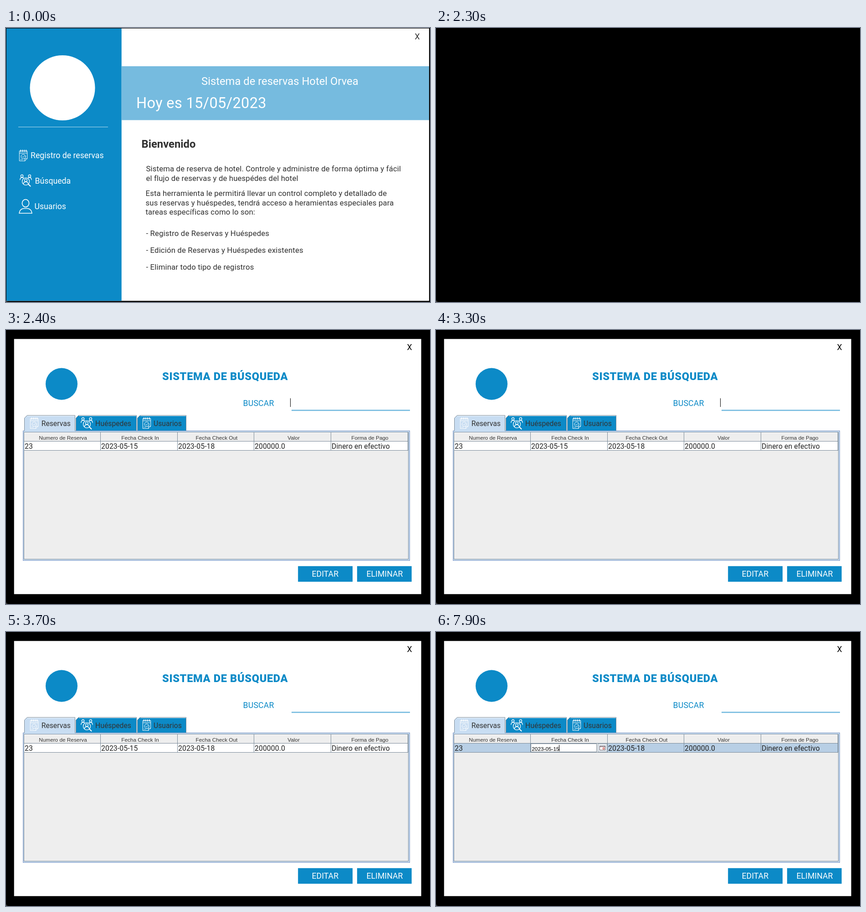
These frames come from a looping animation (931x602 px, 8000 ms). An HTML page:

```html
<!DOCTYPE html>
<html lang="es">
<head>
<meta charset="utf-8">
<title>Sistema de reservas</title>
<style>
html, body { margin: 0; width: 100%; height: 100%; overflow: hidden; background: #000; }
svg { display: block; position: absolute; left: 0; top: 0; }
text { font-family: Roboto, sans-serif; white-space: pre; }
.ui { font-family: "Liberation Sans", Arial, sans-serif; font-size: 11.8px; }
.icon { fill: none; stroke: #fff; stroke-linecap: round; stroke-linejoin: round; }
</style>
</head>
<body>
<svg id="stage" width="931" height="602" viewBox="0 0 931 602"></svg>
<script>
const BLUE = '#0c8ac7', SKY = '#76bbdf', INK = '#303030';
const STEEL = '#7a8a99', EDGE = '#7c95c2', PALE = '#c8ddf2', GREY = '#eeeeee', PICK = '#b8cfe5';

const rect = (x, y, w, h, fill, more = '') =>
  `<rect x="${x}" y="${y}" width="${w}" height="${h}" fill="${fill}" ${more}/>`;
const frame = (x, y, w, h, color, fill = 'none') =>
  rect(x + .5, y + .5, w - 1, h - 1, fill, `stroke="${color}"`);
const path = (d, stroke, fill = 'none', width = 1) =>
  `<path d="${d}" stroke="${stroke}" fill="${fill}" stroke-width="${width}"/>`;
const text = (x, y, size, str, fill = INK, more = '') =>
  `<text x="${x}" y="${y}" font-size="${size}" fill="${fill}" ${more}>${str}</text>`;
const label = (x, y, str, fill = '#333', more = '') =>
  `<text class="ui" x="${x}" y="${y}" fill="${fill}" ${more}>${str}</text>`;
const use = (id, x, y) => `<use href="#${id}" x="${x}" y="${y}"/>`;
const group = (id, body) => `<g id="${id}">${body}</g>`;

const defs = `<defs>
  <g id="book" class="icon" stroke-width="1">
    <path d="M.8 3.5V25H13L18.2 20V3.5ZM13 25V20H18M1 8H18"/>
    <path d="M3.5 1V5M7.5 1V5M11.5 1V5M15.5 1V5" stroke-width="1.6"/>
    <circle cx="9.5" cy="15.5" r="5"/><path d="M7 15.5L9 17.5L12.5 13.5"/>
    <path d="M3 22H8" stroke-width=".8"/>
  </g>
  <g id="people" class="icon" stroke-width="1.3">
    <circle cx="5" cy="3.7" r="2.7"/><circle cx="21.8" cy="3.7" r="2.7"/>
    <path d="M.8 12Q1 7 5 7Q7.5 7 8.5 8M26 12Q26 7 21.800 7Q19.500 7 18.500 8"/>
    <circle cx="13.5" cy="15.7" r="8"/><circle cx="13.5" cy="13" r="2.9"/>
    <path d="M8.5 21Q8.5 16.5 13.5 16.5T18.5 21"/>
    <path d="M19.5 22L23.5 26" stroke-width="2.2"/>
  </g>
  <g id="user" class="icon" stroke-width="1.7">
    <ellipse cx="15" cy="9" rx="7.6" ry="8.3"/>
    <path d="M1 31Q2 21.5 11 20.5H19Q28 21.5 29 31Z"/>
  </g>
</defs>`;

function menuView() {
  const body = (x, y, str) => text(x, y, 16.75, str, INK, 'letter-spacing=".14"');
  return rect(1, 1, 928, 598.5, '#fff') + rect(1, 1, 252.7, 598.5, BLUE) +
    group('hover', rect(1, 308, 252.7, 55, SKY)) +
    '<circle cx="124" cy="131.5" r="71.5" fill="#fff"/>' +
    rect(27, 217, 197, 1, '#b5dcef') +
    use('book', 28.5, 267) + text(54, 286, 17.7, 'Registro de reservas', '#fff') +
    use('people', 30, 321.5) + text(63.5, 341.5, 17.7, 'Búsqueda', '#fff') +
    use('user', 28, 376) + text(62.5, 398, 17.7, 'Usuarios', '#fff') +
    text(897.5, 25, 17.7, 'X') +
    rect(253.7, 84, 675.3, 118.4, SKY) +
    text(429, 125, 23.8, 'Sistema de reservas Hotel Orvea', '#fff') +
    text(286, 176, 32.5, 'Hoy es 15/05/2023', '#fff', 'letter-spacing=".35"') +
    text(297.5, 263, 23.8, 'Bienvenido', INK, 'font-weight="700"') +
    body(307.5, 315, 'Sistema de reserva de hotel. Controle y administre de forma óptima y fácil') +
    body(307.5, 335.5, 'el flujo de reservas y de huespédes del hotel') +
    body(306.5, 369, 'Esta herramienta le permitirá llevar un control completo y detallado de') +
    body(306.5, 389.5, 'sus reservas y huéspedes, tendrá acceso a heramientas especiales para') +
    body(306.5, 410, 'tareas específicas como lo son:') +
    body(307.5, 456.5, '- Registro de Reservas y Huéspedes') +
    body(307.5, 494, '- Edición de Reservas y Huéspedes existentes') +
    body(307.5, 531, '- Eliminar todo tipo de registros');
}

function tab(x, w, icon, ix, tx, name, fill) {
  const d = `M${x + .5} 221.5V193.5L${x + 6.5} 187.5H${x + w - .5}V221.5`;
  return path(d, STEEL, fill) +
    path(`M${x + 7} 188.5H${x + w - 1}`, '#fff') +
    use(icon, ix, 191.5) + text(tx, 210.5, 15.75, name, '#333');
}

function table() {
  const cols = [
    [40, 'Numero de Reserva', '23', 125],
    [208, 'Fecha Check In', '2023-05-15', 294.5],
    [377, 'Fecha Check Out', '2023-05-18', 462.5],
    [545, 'Valor', '200000.0', 631.5],
    [714, 'Forma de Pago', 'Dinero en efectivo', 799]
  ];
  const edges = cols.slice(1).map(c => c[0] - 1).concat(882);
  return frame(37, 221, 850, 286, EDGE, PALE) + frame(39, 224, 845, 280, STEEL, GREY) +
    rect(40, 225, 842, 1, '#fff') +
    rect(40, 245, 842, 19, '#fff') + group('picked', rect(40, 245, 842, 19, PICK)) +
    rect(40, 244, 842, 1, STEEL) + rect(40, 264, 843, 1, STEEL) +
    edges.map(x => rect(x, 225, 1, 40, STEEL)).join('') +
    cols.map(([x, head, cell, mid]) =>
      label(mid, 241, head, '#333', 'text-anchor="middle"') +
      text(x + 1, 261, 15.75, cell, '#222', 'letter-spacing=".1"')).join('');
}

function editor() {
  return rect(208, 245, 168, 19, GREY) + frame(208, 245, 145, 19, STEEL, '#fff') +
    label(210.3, 260.5, '2023-05-15', '#000') + rect(270, 248, 1, 14, '#000') +
    frame(355, 245, 21, 19, '#9aa7b3', '#e4eaf0') +
    frame(359, 250, 13, 10, '#66606a', '#fff') + rect(360, 251, 11, 2, '#b9a4a8') +
    frame(366, 254, 4, 4, '#c8403c');
}

function searchView() {
  const button = (x, tx, name) =>
    rect(x, 518.8, 119.8, 34.3, BLUE) + text(tx, 542, 17.7, name, '#fff');
  return rect(17.7, 19.7, 894, 560.6, '#fff') +
    `<circle cx="122" cy="118.5" r="35" fill="${BLUE}"/>` +
    text(880.5, 43.5, 17.7, 'X', '#000') +
    text(343, 110, 23.6, 'SISTEMA DE BÚSQUEDA', BLUE, 'font-weight="900" letter-spacing=".65"') +
    text(520.5, 167, 17.7, 'BUSCAR', BLUE, 'letter-spacing=".2"') +
    rect(627, 175.2, 260, 2.6, SKY) +
    group('caret', rect(624, 150, 1, 19, '#000')) +
    tab(153, 134, 'people', 164, 196, 'Huéspedes', BLUE) +
    tab(288, 108, 'book', 299.5, 324, 'Usuarios', BLUE) +
    table() +
    tab(40, 112, 'book', 52.5, 77.7, 'Reservas', PALE) +
    rect(41, 221, 110, 1, PALE) +
    group('focus', path('M42.5 219.5V194.5L47.5 189.5H150V219.5Z', '#7f9ccb')) +
    group('editor', editor()) +
    button(641.2, 671.5, 'EDITAR') + button(770.9, 791.5, 'ELIMINAR');
}

const stage = document.getElementById('stage');
stage.innerHTML = defs + rect(0, 0, 931, 602, '#000') + path('M0 598L4 602H0Z', 'none', '#333') +
  group('menu', menuView()) + group('search', searchView());

// Start time and the parts visible from then on.
const LOOP = 8000;
const steps = [
  [0, 'menu'],
  [1000, 'menu hover'],
  [2300, ''],
  [2400, 'search caret'],
  [2800, 'search'],
  [3300, 'search caret'],
  [3700, 'search'],
  [4200, 'search caret'],
  [4500, 'search focus'],
  [7900, 'search picked editor']
].map(([at, parts]) => [at, parts.split(' ')]);

const parts = ['menu', 'hover', 'search', 'caret', 'focus', 'picked', 'editor']
  .map(id => [id, document.getElementById(id)]);
const start = performance.now();

function draw(now) {
  const t = Math.max(0, now - start) % LOOP;
  const shown = steps.filter(s => s[0] <= t).pop()[1];
  for (const [id, el] of parts) el.style.display = shown.includes(id) ? '' : 'none';
  requestAnimationFrame(draw);
}
draw(start);
</script>
</body>
</html>
```
